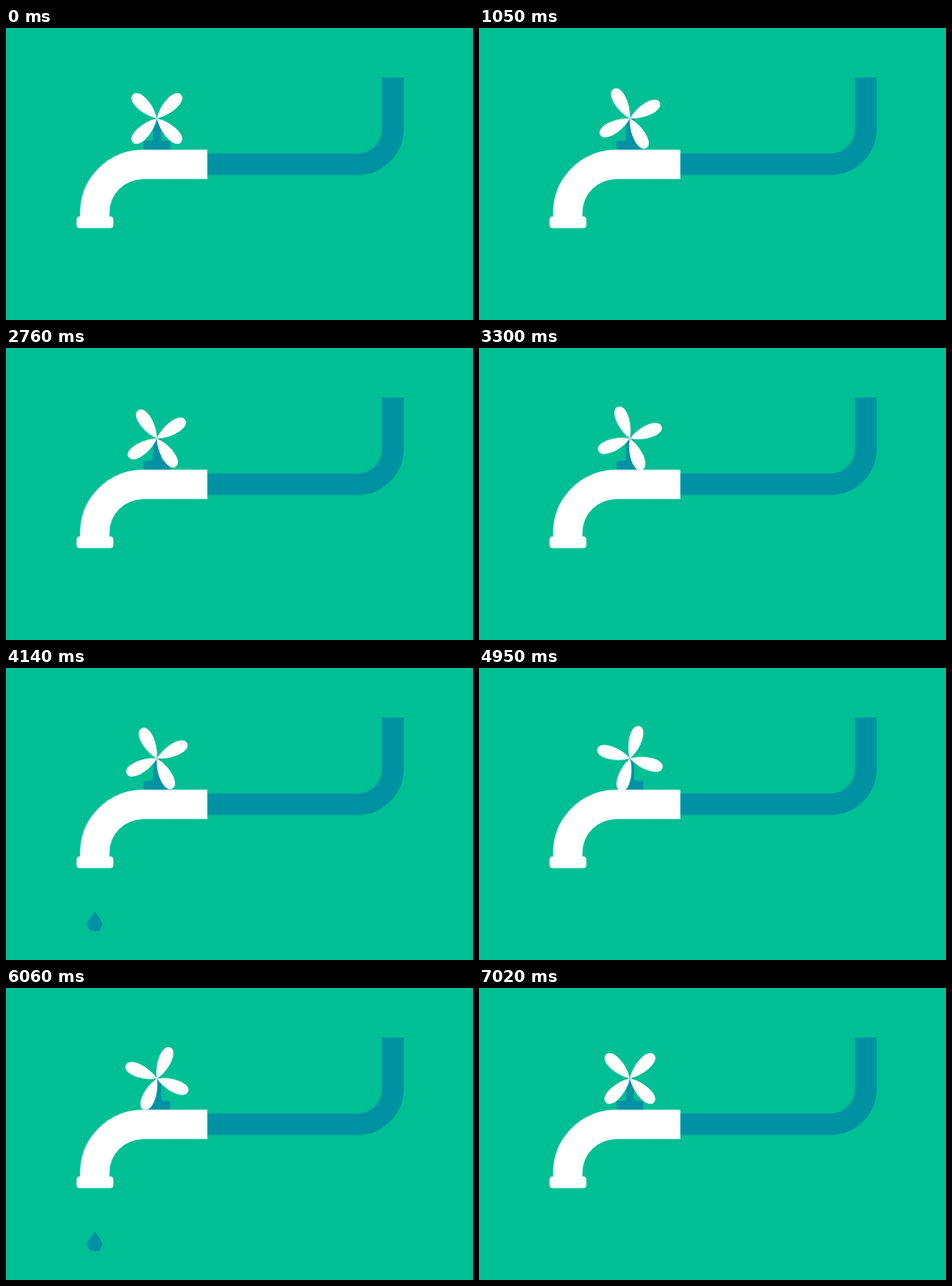
Recreate the animation shown at these times as an HTML page. Size 500 by 313 pixels, loop 7170 ms.

```html
<!DOCTYPE html>
<html lang="en">
<head>
<meta charset="utf-8">
<title>Dripping tap</title>
<style>
  html, body { margin: 0; width: 100%; height: 100%; overflow: hidden; background: #00bf94; }
  svg { display: block; width: 100%; height: 100%; }
</style>
</head>
<body>
<svg viewBox="0 0 500 313">
  <defs>
    <path id="petal" d="M0 0C-9-14-9.5-36.3 0-36.3S9-14 0 0Z"/>
    <path id="drop" d="M0-14C3-8 8-5 8 0A8 8 0 0 1-8 0C-8-5-3-8 0-14Z"/>
  </defs>
  <rect width="500" height="313" fill="#00bf94"/>
  <g fill="none" stroke="#0092a2" stroke-width="23.2">
    <path d="M414.2 53V108A38 38 0 0 1 376.2 146H200"/>
  </g>
  <g fill="#0092a2">
    <rect x="147.5" y="121" width="28.5" height="14" rx="1.5"/>
    <path d="M157.5 97H166V118Q166 121 169 121V123H154.500V121Q157.500 121 157.500 118Z"/>
  </g>
  <g id="drops"></g>
  <path d="M215.500 146.200H147A52 52 0 0 0 95 198.200V206" fill="none" stroke="#fff" stroke-width="31.400"/>
  <rect x="75.500" y="202" width="39.500" height="12.400" rx="3.500" fill="#fff"/>
  <g id="wheel" fill="#fff"></g>
</svg>
<script>
const LOOP = 7170, STEP = 30;
const TURN_START = 210, TURN_END = 7020, TURN = 720;
const NOZZLE = { x: 95, y: 206 };
const GRAVITY = 394; // half the acceleration, px/s²
const DARK = '#353535', BLUE = '#0092a2';

function addUse(parent, id, attrs) {
  const node = document.createElementNS('http://www.w3.org/2000/svg', 'use');
  node.setAttribute('href', '#' + id);
  for (const key in attrs) node.setAttribute(key, attrs[key]);
  return parent.appendChild(node);
}

const wheel = document.getElementById('wheel');
for (let i = 0; i < 4; i++) addUse(wheel, 'petal', { transform: `rotate(${45 + 90 * i})` });

const dropLayer = document.getElementById('drops');
const drops = [
  { start: 2052, fill: DARK },
  { start: 2014, fill: DARK },
  ...[0, 1, 2, 3].map(i => ({ start: 3722 + 640 * i, fill: BLUE }))
].map(({ start, fill }) => ({ start, node: addUse(dropLayer, 'drop', { fill }) }));

// cubic-bezier(.5, 0, .5, 1), solved by bisection
function ease(x) {
  let low = 0, high = 1;
  for (let i = 0; i < 30; i++) {
    const s = (low + high) / 2;
    if (1.5 * s * (1 - s) + s ** 3 < x) low = s; else high = s;
  }
  return low * low * (3 - 2 * low);
}

function render(time) {
  const t = Math.floor(time % LOOP / STEP) * STEP;
  const progress = Math.min(1, Math.max(0, (t - TURN_START) / (TURN_END - TURN_START)));
  wheel.setAttribute('transform', `translate(161.6 97) rotate(${TURN * ease(progress)})`);

  for (const { start, node } of drops) {
    const fall = (t - start) / 1000;
    const y = NOZZLE.y + GRAVITY * fall * fall;
    node.style.display = fall > 0 && y < 330 ? '' : 'none';
    node.setAttribute('transform', `translate(${NOZZLE.x} ${y})`);
  }
}

const origin = performance.now();
function tick() {
  render(performance.now() - origin);
  requestAnimationFrame(tick);
}
tick();
</script>
</body>
</html>
```
